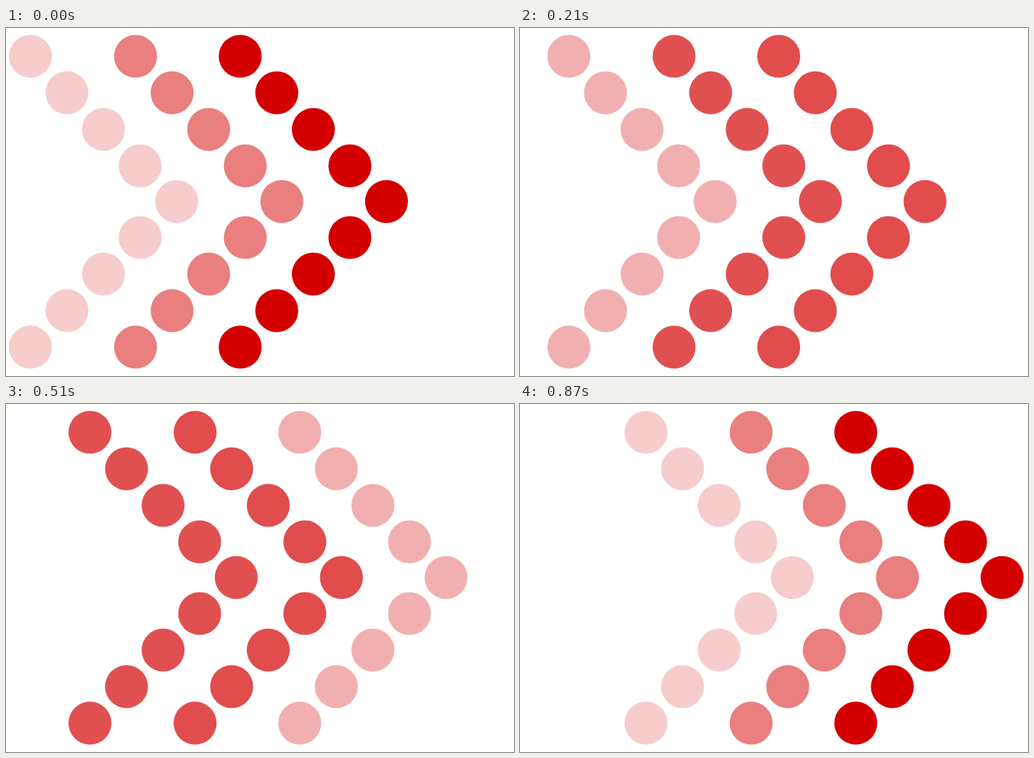
Recreate the animation shown at these times as an HTML page with a canvas. Size 700 by 480 pixels, loop 0.9 s.

```html
<!DOCTYPE html>
<html lang="en">
<head>
<meta charset="utf-8">
<title>Moving chevrons</title>
<style>
  html, body { margin: 0; width: 100%; height: 100%; overflow: hidden; background: #fff; }
  canvas { display: block; }
</style>
</head>
<body>
<canvas id="stage" width="700" height="480"></canvas>
<script>
const ctx = document.getElementById('stage').getContext('2d');

const LOOP = 900, STEP = 30, TRAVEL = 140;
const RADIUS = 29.6, PITCH = 50.4, MID_Y = 239.6, INNER = 49.4;
const CHEVRON_X = [33.6, 178.5, 322.7];
const LEVELS = [0.2, 0.5, 1];
const PHASE = 300, FADE_START = 180, FADE_TIME = 80;

// Each chevron steps through the levels, with a short fade between holds.
function opacity(chevron, time) {
  const phase = Math.floor(time / PHASE);
  const fade = Math.min(1, Math.max(0, (time % PHASE - FADE_START) / FADE_TIME));
  const from = LEVELS[(chevron + phase) % 3];
  const to = LEVELS[(chevron + phase + 1) % 3];
  return from + (to - from) * fade;
}

function dot(x, y) {
  ctx.beginPath();
  ctx.arc(x, y, RADIUS, 0, Math.PI * 2);
  ctx.fill();
}

function drawChevron(x) {
  for (let i = 0; i < 4; i++) {
    const offset = INNER + PITCH * (3 - i);
    dot(x + PITCH * i, MID_Y - offset);
    dot(x + PITCH * i, MID_Y + offset);
  }
  dot(x + PITCH * 4, MID_Y - 0.3);
}

function draw(now) {
  const time = Math.floor((now % LOOP) / STEP) * STEP;
  const shift = TRAVEL * time / (LOOP - STEP);
  ctx.globalAlpha = 1;
  ctx.fillStyle = '#fff';
  ctx.fillRect(0, 0, 700, 480);
  ctx.fillStyle = '#d40000';
  CHEVRON_X.forEach((x, i) => {
    ctx.globalAlpha = opacity(i, time);
    drawChevron(x + shift);
  });
}

const start = performance.now();
function tick() {
  draw(performance.now() - start);
  requestAnimationFrame(tick);
}
tick();
</script>
</body>
</html>
```
